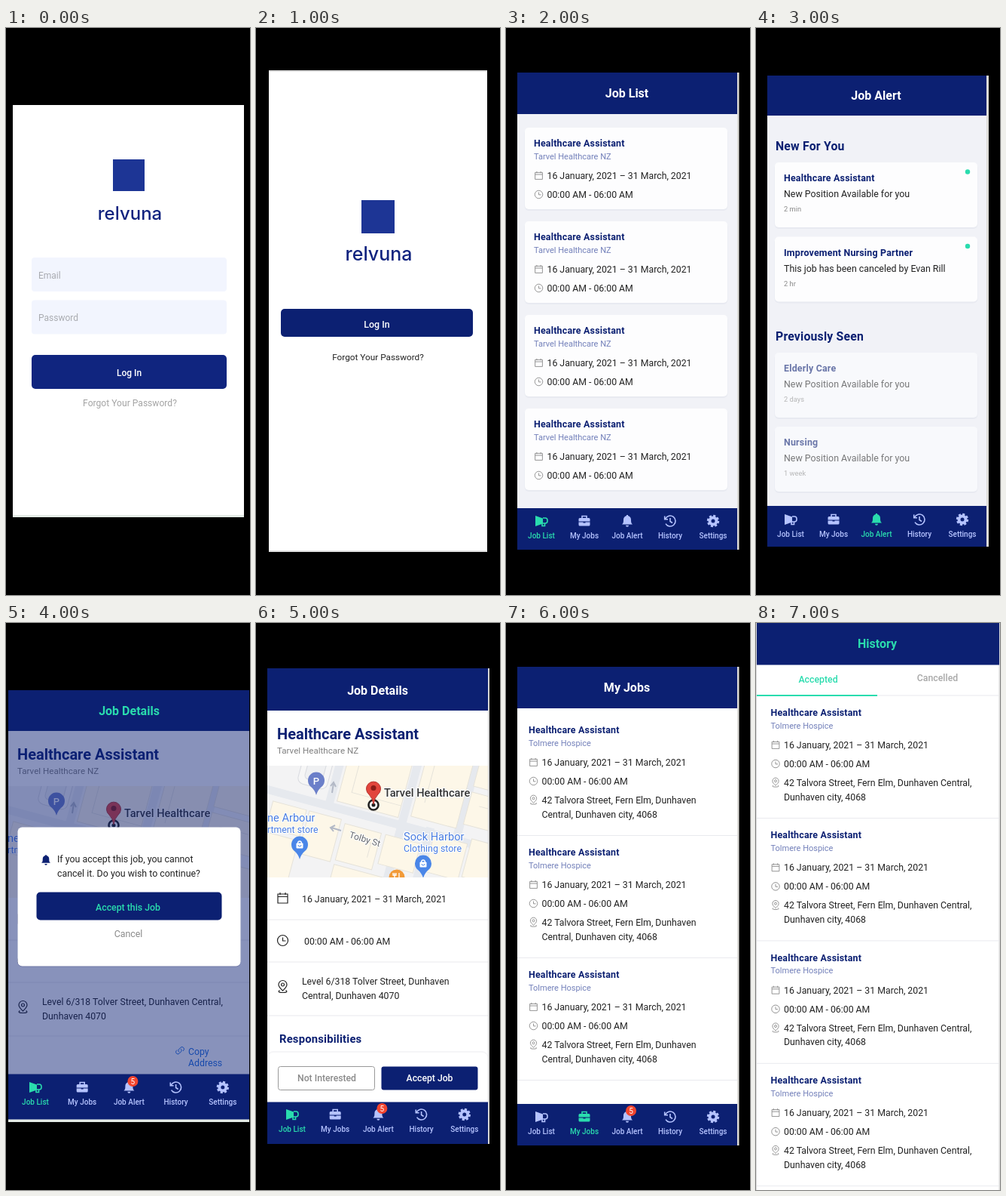
Write an HTML page that moves like this. It is 324 px wide and 751 px high and loops after 8 s.

```html
<!DOCTYPE html>
<html lang="en">
<head>
<meta charset="utf-8">
<title>Shift app screens</title>
<style>
  html, body { margin: 0; width: 100%; height: 100%; overflow: hidden; background: #000; }
  #stage { display: block; width: 100vw; height: 100vh; font-family: Roboto, sans-serif; }
  .line { fill: none; stroke: currentColor; }
  .solid { fill: currentColor; }
  .brand { font-family: Inter, sans-serif; }
  .halo { paint-order: stroke; stroke: #fff; stroke-width: 2px; }
</style>
</head>
<body>
<svg id="stage" viewBox="0 0 324 751"></svg>
<script>
const NAVY = '#0c2072', GREEN = '#2adcae', INK = '#222', GRAY = '#8a8a8a', RULE = '#e9eaee', BLUE = '#4a7de0';
const ROLE = 'Healthcare Assistant';
const DATES = '16 January, 2021 – 31 March, 2021', HOURS = '00:00 AM - 06:00 AM';

// Drawing helpers; every one returns SVG markup.
const rect = (x, y, w, h, fill, r = 0, more = '') =>
  `<rect x="${x}" y="${y}" width="${w}" height="${h}" rx="${r}" fill="${fill}" ${more}/>`;
const text = (x, y, size, str, fill = INK, more = '') =>
  `<text x="${x}" y="${y}" font-size="${size}" fill="${fill}" ${more}>${str}</text>`;
const MID = 'text-anchor="middle"', MEDIUM = 'font-weight="500"', BOLD = 'font-weight="600"';
const SPACED = 'font-weight="600" letter-spacing=".2"';
const label = (x, y, size, str, fill, more = MEDIUM) => text(x, y, size, str, fill, `${MID} ${more}`);
const dot = (x, y, r, fill) => `<circle cx="${x}" cy="${y}" r="${r}" fill="${fill}"/>`;
const path = (d, fill, more = '') => `<path d="${d}" fill="${fill}" ${more}/>`;
const clip = (x, y, w, h, body) =>
  `<svg x="${x}" y="${y}" width="${w}" height="${h}" viewBox="${x} ${y} ${w} ${h}">${body}</svg>`;
const shift = (x, y, body) => `<g transform="translate(${x} ${y})">${body}</g>`;

const line = (d, width) => `<path class="line" stroke-width="${width}" d="${d}"/>`;
const solid = d => `<path class="solid" d="${d}"/>`;
const ICONS = {
  horn: solid('M-8-7 2-3.5V3.5L-8 7z') + line('M2-4h3a3 3 0 0 1 3 3v1a3 3 0 0 1-3 3H2M1 3v3.5h3.5V3', 1.6),
  bag: solid('M-6-4h12a1.5 1.5 0 0 1 1.5 1.5v7.5a1.5 1.5 0 0 1-1.5 1.5h-12a1.5 1.5 0 0 1-1.5-1.5v-7.5a1.5 1.5 0 0 1 1.5-1.5z')
    + line('M-3-4v-2.5h6v2.5', 1.6) + path('M-8 1h16M-1.5 2h3', 'none', `stroke="${NAVY}" stroke-width="1.2"`),
  bell: solid('M-7 4.5C-5 3-5 1-5-2a5 5 0 0 1 10 0C5 1 5 3 7 4.5zM-2 5.8h4a2 2 0 0 1-4 0zM-1-8h2v2h-2z'),
  history: line('M-6.3-3A7 7 0 1 1-6 3.6M-7.3-6.5v4.3h4.3M0-4v4.5l3 2', 1.6),
  gear: '<circle class="line" r="4.5" stroke-width="4"/><circle class="line" r="6.8" stroke-width="2.8" stroke-dasharray="3 2.34"/>',
  calendar: line('M-6.5-5.5h13v12h-13zM-6.5-2h13M-3.5-7.5v3M3.5-7.5v3', 1.2),
  clock: line('M-7 0a7 7 0 1 1 14 0a7 7 0 1 1-14 0M0-4v4.5h4', 1.2),
  place: line('M0 5C-3 2-5.5 0-5.5-3a5.5 5.5 0 0 1 11 0C5.5 0 3 2 0 5zM-2-3a2 2 0 1 1 4 0a2 2 0 1 1-4 0M-4 4.5q-4 3 4 3t4-3', 1.2),
  link: line('M-1 2.5a2.7 2.7 0 0 1-.5-3.8l2.5-2.5a2.7 2.7 0 0 1 3.8 3.8l-1 1M1-2a2.7 2.7 0 0 1 .5 3.8l-2.5 2.5a2.7 2.7 0 0 1-3.8-3.8l1-1', 1)
};
const icon = (name, x, y, color, scale = 1) =>
  `<g transform="translate(${x} ${y}) scale(${scale})" color="${color}">${ICONS[name]}</g>`;

const TABS = [['horn', 'Job List'], ['bag', 'My Jobs'], ['bell', 'Job Alert'], ['history', 'History'], ['gear', 'Settings']];
function tabBar(x, step, y, active, badge) {
  const tabs = TABS.map(([name, title], i) => {
    const color = i === active ? GREEN : '#b5c3ff', cx = x + i * step;
    return icon(name, cx, y, color) + label(cx, y + 23, 10, title, color);
  });
  const cx = x + 2 * step + 5;
  return tabs.join('') + (badge ? dot(cx, y - 8, 7, '#f2452f') + label(cx, y - 4.4, 10, '5', '#fff', '') : '');
}

const header = (x, y, w, h, title, color, cx, base) =>
  rect(x, y, w, h, NAVY) + label(cx, base, 16, title, color, BOLD);

// Phone screen with a header, a body and the tab bar.
function phone(top, bottom, title, active, body, paper, badge) {
  return rect(15, top, 294.5, bottom - top, '#dddcd8') + rect(15, top, 292, bottom - top, paper) + body
    + header(15, top, 292, 55, title, '#fff', 160.5, top + 33)
    + rect(15, bottom - 55, 292, 55, NAVY) + tabBar(47, 57, bottom - 38, active, badge);
}

const brand = (x, y, size, cx, base, fontSize) =>
  rect(x, y, size, size, '#1d3595') + label(cx, base, fontSize, 'relvuna', '#10237f', 'class="brand" font-weight="500"');

function signIn() {
  const field = (y, hint) => rect(34, y, 259, 45, '#f2f5fe', 4) + text(43, y + 27.5, 12, hint, '#a9abb0');
  return rect(9, 102, 307, 546, '#fff') + rect(9, 645, 307, 3, '#e4ebe6')
    + brand(142, 174, 42, 164.5, 254, 24)
    + field(304, 'Email') + field(360.5, 'Password')
    + rect(34, 433, 259, 45, '#10257f', 5) + label(163.5, 461, 12, 'Log In', '#fff')
    + label(164.5, 501, 12.1, 'Forgot Your Password?', '#a3a3a3', '');
}

function welcome() {
  return rect(17, 56, 290, 638, '#e0e0e0') + rect(17, 58, 290, 634, '#fff')
    + brand(140, 228, 44, 163, 308, 25)
    + rect(33, 372, 255, 37, NAVY, 5) + label(160.5, 396.5, 12.4, 'Log In', '#fff')
    + label(162, 440, 11.8, 'Forgot Your Password?', INK, '');
}

const card = (y, h, fill = '#fdfdfe') =>
  rect(24.5, y + 1, 270, h + 1, '#e8eaf1', 6) + rect(25, y, 269, h, fill, 5);

function alerts() {
  const notice = (y, title, message, age, seen) =>
    card(y, 86, seen ? '#f8f9fc' : '#fdfdfe')
    + `<g opacity="${seen ? .6 : 1}">` + text(37, y + 25, 12.4, title, NAVY, SPACED)
    + text(37, y + 46, 12.4, message) + text(37, y + 65, 9.3, age, GRAY) + '</g>'
    + (seen ? '' : dot(281, y + 12.5, 3.2, GREEN));
  const offer = 'New Position Available for you';
  return rect(15, 63, 294, 624, '#dddcd8') + rect(15, 63, 291, 624, '#f1f2f7') + rect(15, 116, 291, 3, '#f9f2f6')
    + header(15, 63, 291, 53, 'Job Alert', '#fff', 159.5, 95)
    + text(26, 162, 15.8, 'New For You', NAVY, SPACED)
    + notice(178, ROLE, offer, '2 min')
    + notice(276.5, 'Improvement Nursing Partner', 'This job has been canceled by Evan Rill', '2 hr')
    + text(26, 413.5, 15.8, 'Previously Seen', NAVY, SPACED)
    + notice(430, 'Elderly Care', offer, '2 days', true)
    + notice(528, 'Nursing', offer, '1 week', true)
    + rect(15, 633, 291, 54, NAVY) + tabBar(46, 57, 651, 2);
}

// One job entry; the origin is the left end of the title's baseline.
function entry(x, y, place, address = []) {
  const row = (name, dy, str) => icon(name, 6.5, dy - 4.5, GRAY, .75) + text(17.5, dy, 12.3, str);
  return shift(x, y, text(0, 0, 12.4, ROLE, NAVY, SPACED) + text(0, 16.5, 11, place, '#7380ba')
    + row('calendar', 43, DATES) + row('clock', 68, HOURS)
    + (address.length ? row('place', 93, address[0]) + text(17.5, 111.5, 12.3, address[1]) : ''));
}

function jobList() {
  const cards = [0, 1, 2, 3].map(i => card(132 + i * 124, 108) + entry(37, 157 + i * 124, 'Tarvel Healthcare NZ'));
  return phone(59, 691, 'Job List', 0, cards.join(''), '#f1f2f7');
}

function myJobs() {
  const jobs = [0, 1, 2].map(i => entry(30, 146 + i * 162, 'Tolmere Hospice',
    ['42 Talvora Street, Fern Elm, Dunhaven', 'Central, Dunhaven city, 4068']) + rect(15, 281 + i * 162, 292, 1, RULE));
  return phone(58, 692, 'My Jobs', 1, jobs.join(''), '#fff', true);
}

function streetMap() {
  const edge = 'stroke="#e6e3da"';
  const block = (x, y, w, h) => rect(x, y, w, h, '#fdf7e8', 0, edge);
  const marker = (x, y, color, glyph) =>
    path(`M${x} ${y + 19}q-2-7-7-11a11 11 0 1 1 14 0q-5 4-7 11z`, color) + glyph;
  const shop = (x, y) => marker(x, y, '#4a86e8', rect(x - 4.5, y - 2.5, 9, 7, '#fff', 1)
    + path(`M${x - 2.5} ${y - 2}a2.5 3 0 0 1 5 0`, 'none', 'stroke="#fff" stroke-width="1.3"')
    + path(`M${x - 2} ${y}a2 2 0 0 0 4 0`, 'none', 'stroke="#4a86e8"'));
  const buildings = [[112, 172, 84, 76], [212, 150, 62, 92], [282, 130, 70, 52], [282, 190, 70, 44],
    [30, 270, 46, 36], [80, 270, 44, 58], [30, 312, 46, 70], [130, 274, 50, 50], [186, 274, 48, 40],
    [130, 330, 104, 50], [248, 258, 46, 50], [298, 250, 60, 52]];
  return clip(15, 189, 321, 148,
    rect(15, 189, 321, 148, '#f3f3f4')
    + '<g transform="rotate(15 156 225)">'
    + path('M0 257H360M203 100V400M241 250V400M103 100V257M278 90V250', 'none', 'stroke="#e6e9ee" stroke-width="11"')
    + buildings.map(b => block(...b)).join('')
    + path('M128 172v60h68M225 150v70M296 206h40M150 290h20v20', 'none', edge)
    + rect(54, 192, 40, 46, '#f6f6f6', 8, 'stroke="#d9dbe0"')
    + rect(62, 200, 24, 30, '#eff0f2', 5, 'stroke="#d9dbe0"') + '</g>'
    + path('M101 225l2-13m-4 4l4-5 3 6M113 275l-13-4m5-3l-6 3 4 5', 'none', 'stroke="#b3b9c6" stroke-width="2"')
    + marker(80, 209, '#6b7fc9', label(80, 213.5, 13, 'P', '#fff'))
    + shop(58, 294) + shop(222, 319)
    + dot(187, 337, 10.5, '#f29a38') + path('M184 331v8M190 331v8M182 331v3h4v-3', 'none', 'stroke="#fff" stroke-width="1.3"')
    + text(15, 263, 14.6, 'ne Arbour', BLUE, 'class="halo"') + text(15, 278, 12.3, 'rtment store', BLUE, 'class="halo"')
    + text(196, 288, 14.6, 'Sock Harbor', BLUE, 'class="halo"') + text(196, 303, 12.4, 'Clothing store', BLUE, 'class="halo"')
    + text(123, 284, 12, 'Tolby St', '#66696f', 'class="halo" transform="rotate(17 123 284)"')
    + '<circle cx="156" cy="241" r="6.5" fill="#fff" stroke="#222" stroke-width="2.6"/>' + dot(156, 241, 2.5, INK)
    + path('M156 240q-1-8-6-13a9.5 9.5 0 1 1 12 0q-5 5-6 13z', '#e2453c', 'stroke="#b5322d"') + dot(156, 218.5, 3.5, '#8c1d18')
    + text(170, 230, 14.6, 'Tarvel Healthcare', '#333', 'class="halo" font-weight="500"'));
}

function jobDetails(address) {
  const row = (name, x, y, str) => icon(name, 35.5, y - 5.5, INK) + text(x, y, 12.3, str);
  return text(28, 154, 20, ROLE, NAVY, 'font-weight="700"') + text(28, 173, 11.6, 'Tarvel Healthcare NZ', '#808080')
    + streetMap()
    + row('calendar', 61, 370, DATES) + row('clock', 64, 426, HOURS)
    + icon('place', 35.5, 482, INK) + text(61, 479, 12.3, address[0]) + text(61, 498, 12.3, address[1])
    + [392.5, 448.5, 519.5].map(y => rect(15, y, 321, 1, RULE)).join('');
}

function confirmJob() {
  const body = jobDetails(['Level 6/318 Tolver Street, Dunhaven Central,', 'Dunhaven 4070']);
  return rect(3, 89, 320, 572, '#e4ebe6') + clip(3, 89, 320, 509, rect(3, 89, 320, 509, '#fff')
      + shift(-13, 27, body)
      + icon('link', 231, 566, '#1f6fe0')
      + text(242, 572, 12.3, 'Copy', '#1f6fe0') + text(242, 587, 12.3, 'Address', '#1f6fe0')
      + rect(3, 89, 320, 509, 'rgba(14,33,116,.49)'))
    + header(3, 89, 320, 54, 'Job Details', GREEN, 163.5, 122)
    + rect(15.5, 271.5, 296, 184, '#737aa8', 6) + rect(15.5, 270.5, 296, 184, '#fff', 6)
    + icon('bell', 53, 314, NAVY, .85)
    + text(68, 316.5, 12.4, 'If you accept this job, you cannot') + text(68, 335.5, 12.4, 'cancel it. Do you wish to continue?')
    + rect(40.5, 356.5, 246, 37, NAVY, 5) + label(162, 381, 12.3, 'Accept this Job', GREEN)
    + label(162.5, 416, 12.4, 'Cancel', GRAY, '')
    + rect(3, 597.5, 320, 60, NAVY) + tabBar(39, 62.2, 615, 0, true);
}

function reviewJob() {
  const body = jobDetails(['Level 6/318 Tolver Street, Dunhaven', 'Central, Dunhaven 4070']);
  return rect(15, 60, 295, 630, '#d6d6d6') + clip(15, 60, 293, 630, rect(15, 60, 293, 630, '#fff')
    + body + text(31, 556, 14.8, 'Responsibilities', NAVY, SPACED)
    + rect(15, 567, 293, 80, '#f5f5f7', 8) + rect(15, 569, 293, 80, '#fff', 8)
    + rect(29.5, 587.5, 128, 31, '#fff', 3, 'stroke="#999"') + label(94, 607, 12.2, 'Not Interested', GRAY)
    + rect(166.5, 587.5, 128, 31, NAVY, 3) + label(230.5, 607, 12.2, 'Accept Job', '#fff')
    + header(15, 60, 293, 56, 'Job Details', '#fff', 161.5, 95)
    + rect(15, 634.5, 293, 56, NAVY) + tabBar(48, 57.2, 651, 0, true));
}

function history() {
  const jobs = [0, 1, 2, 3].map(i => entry(19.5, 123 + i * 162.4, 'Tolmere Hospice',
    ['42 Talvora Street, Fern Elm, Dunhaven Central,', 'Dunhaven city, 4068']) + rect(1, 258 + i * 162.4, 322, 1, RULE));
  return rect(0, 0, 324, 751, '#d9d9d9') + rect(1, 0, 321.5, 751, '#fff')
    + header(1, 0, 322, 55.5, 'History', GREEN, 161, 33)
    + label(82.5, 79, 12.3, 'Accepted', GREEN) + label(241, 77, 12.3, 'Cancelled', '#a8a8a8')
    + rect(161, 95.5, 161, 1, RULE) + rect(1, 95, 160, 2, GREEN) + jobs.join('');
}

const stage = document.getElementById('stage');
const screens = [signIn, welcome, jobList, alerts, confirmJob, reviewJob, myJobs, history];
stage.innerHTML = screens.map(draw => `<g display="none">${draw()}</g>`).join('');

const start = performance.now();
let shown = -1;
function tick() {
  const current = Math.floor((performance.now() - start) / 1000) % screens.length;
  if (current !== shown) {
    [...stage.children].forEach((g, i) => g.setAttribute('display', i === current ? 'inline' : 'none'));
    shown = current;
  }
  requestAnimationFrame(tick);
}
tick();
</script>
</body>
</html>
```
